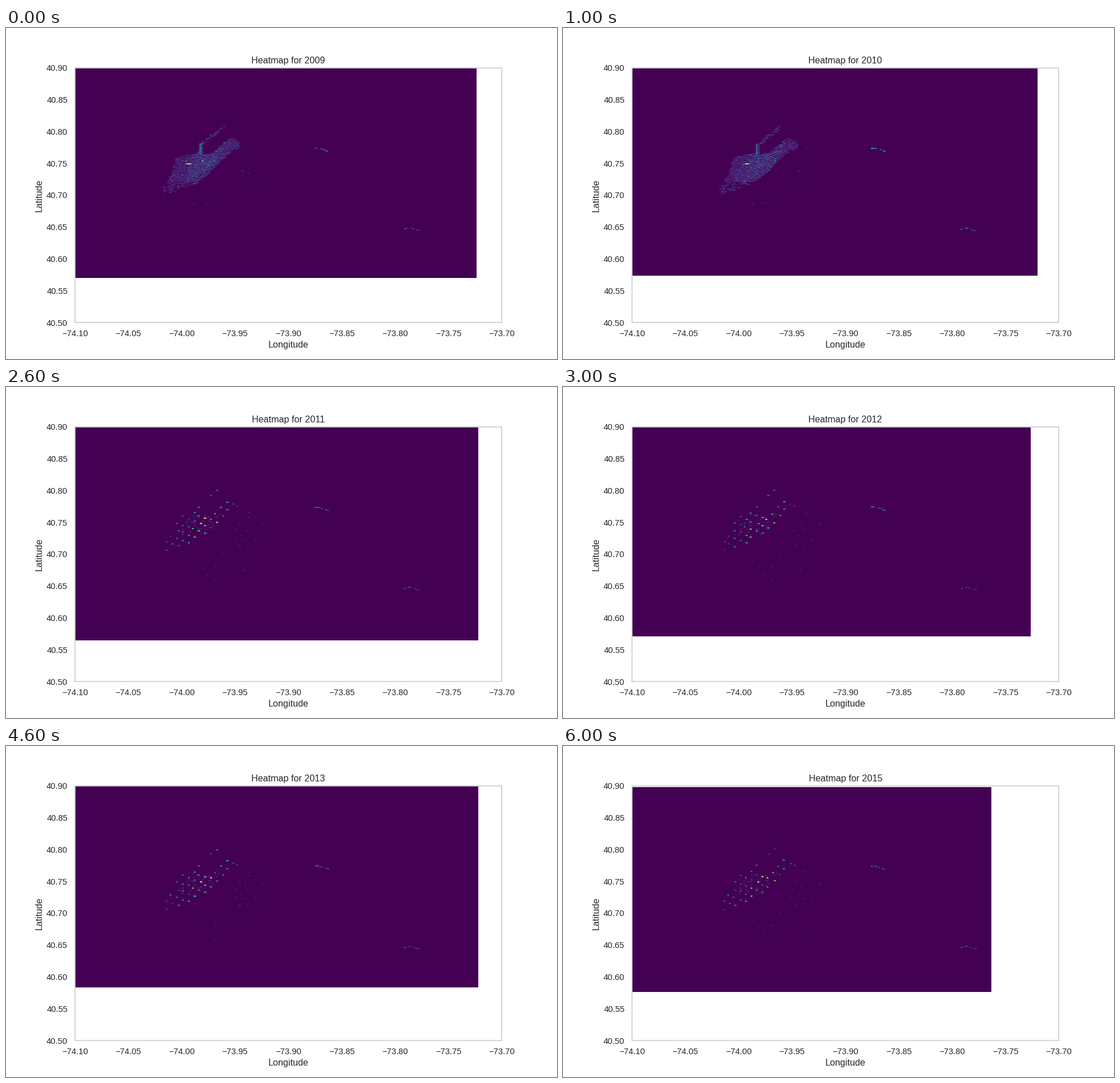
A matplotlib script for the animation above (7 s loop, 966 by 580 pixels).

```python
import numpy as np
import matplotlib.pyplot as plt
from matplotlib.animation import FuncAnimation
from matplotlib.path import Path

W, H, DPI = 966, 580, 100
SCALE = W / 1000  # type and lines are sized for a 1000 px wide figure
BINS = 200
LEFT, RIGHT = 0.125 * W, 0.9 * W
TOP, BOTTOM = 0.12 * H, 0.89 * H

STYLE = {
    "font.family": "Liberation Sans",
    "text.color": ".15",
    "axes.labelcolor": ".15",
    "axes.edgecolor": ".8",
    "xtick.color": ".15",
    "ytick.color": ".15",
    "xtick.bottom": False,
    "ytick.left": False,
}
SIZES = {
    "axes.linewidth": 1.25,
    "axes.labelsize": 12,
    "axes.titlesize": 12,
    "axes.titlepad": 6,
    "axes.labelpad": 4,
    "xtick.labelsize": 11,
    "ytick.labelsize": 11,
    "xtick.major.size": 6,
    "ytick.major.size": 6,
    "xtick.major.pad": 3.5,
    "ytick.major.pad": 3.5,
}
plt.rcParams.update(STYLE)
plt.rcParams.update({key: size * SCALE for key, size in SIZES.items()})

# Stage-pixel extent of the histogram for each year: right, top, bottom.
EXTENTS = {
    2009: (825, TOP, 438),
    2010: (832, TOP, 434),
    2011: (828, TOP, 444),
    2012: (820, TOP, 437),
    2013: (828, TOP, 423),
    2014: (750, 89, 418),
    2015: (751, 72, 431),
}
YEARS = list(EXTENTS)

# Outline of the busy island, with the park as a notch.
ISLAND = Path([
    (386, 166), (338, 204), (337, 218), (299, 227), (290, 256), (275, 279),
    (276, 292), (302, 284), (332, 273), (352, 258), (397, 215), (411, 211),
    (411, 200), (394, 192), (361, 219), (345, 221), (345, 206), (380, 178)])


def lon(x):
    return -74.1 + 0.4 * (x - LEFT) / (RIGHT - LEFT)


def lat(y):
    return 40.9 - 0.4 * (y - TOP) / (BOTTOM - TOP)


def midtown(x, y):
    """Density bump stretched along the avenues."""
    dx, dy = x - 350, y - 235
    return np.exp(-((dx - dy) / 59) ** 2 - ((dx + dy) / 26) ** 2)


def put(grid, year, x, y, level):
    """Raise the bins under stage pixels to at least the given level."""
    right, top, bottom = EXTENTS[year]
    col = ((x - LEFT) / (right - LEFT) * BINS).astype(int)
    row = ((y - top) / (bottom - top) * BINS).astype(int)
    np.maximum.at(grid, (row, col), np.clip(level, 0, 1))


def add_airports(grid, year, peak):
    t = np.linspace(0, 1, 6)
    put(grid, year, 542 + 22 * t, 210.6 + 5.5 * t ** 2,
        peak * (1 - 0.65 * np.sin(np.pi * t)))
    put(grid, year, 700 + 25 * t, 353 - 2 * np.sin(5 * t),
        0.5 * peak * (1 - 0.5 * t))


def add_strays(grid, year, count, peak):
    """Faint spots across the river, the same every year."""
    rng = np.random.default_rng(8)
    angle = rng.uniform(-0.6, 1.8, count)
    radius = rng.uniform(58, 108, count)
    put(grid, year, 345 + radius * np.cos(angle),
        240 + radius * np.sin(angle), rng.uniform(0.3, 1, count) * peak)


def street_grid(year):
    right, top, bottom = EXTENTS[year]
    rng = np.random.default_rng(year)
    steps = (np.arange(BINS) + 0.5) / BINS
    x, y = np.meshgrid(LEFT + steps * (right - LEFT),
                       top + steps * (bottom - top))
    inside = ISLAND.contains_points(
        np.c_[x.ravel(), y.ravel()]).reshape(x.shape)
    row, col = np.indices(x.shape)
    weave = np.where((row + col) % 2, 1, 0.4)
    noise = rng.lognormal(-0.1, 0.4, x.shape)
    level = (0.12 + 0.12 * midtown(x, y)) * weave * noise
    sparse = (y > 270) | (y < 200) & (x < 385)
    level[sparse & (rng.random(x.shape) < 0.4)] = 0
    grid = np.where(inside, level, 0)

    bar = np.linspace(204, 222, 12)
    put(grid, year, np.full(12, 341), bar, rng.uniform(0.2, 0.38, 12))
    station = np.array([317, 320.5, 324])
    put(grid, year, station, np.full(3, 237.3), np.array([0.45, 1, 0.8]))
    add_strays(grid, year, 9, 0.1)
    add_airports(grid, year, 0.45 if year == 2009 else 0.6)
    return grid


def zone_grid(year):
    rng = np.random.default_rng(21)
    yearly = np.random.default_rng(year)
    grid = np.zeros((BINS, BINS))

    haze = rng.normal((345, 238), (20, 12), (60, 2))
    haze = haze[ISLAND.contains_points(haze)]
    put(grid, year, *haze.T, rng.uniform(0.02, 0.1, len(haze)))

    # Zone centres: a loose lattice along avenues (u) and streets (v).
    u, v = (a.ravel() for a in np.mgrid[-7:8, -6:7])
    zones = np.c_[349.7 + 9.8 * u + 9.5 * v, 228.5 - 10.2 * u + 3.8 * v]
    zones = zones[ISLAND.contains_points(zones, radius=2)]
    zones += rng.uniform(-1.5, 1.5, zones.shape) * [1, 0.8]
    x, y = zones.T
    level = (rng.uniform(0.15, 0.45, len(x))
             + 0.75 * midtown(x, y) * rng.uniform(0.6, 1.1, len(x)))
    put(grid, year, x, y, level * yearly.uniform(0.88, 1.1, len(x)))

    add_strays(grid, year, 24, 0.09)
    add_airports(grid, year, 0.4)
    return grid


GRIDS = {year: (street_grid if year < 2011 else zone_grid)(year)
         for year in YEARS}

fig, ax = plt.subplots(figsize=(W / DPI, H / DPI), dpi=DPI)
fig.subplots_adjust(left=0.125, right=0.9, bottom=0.11, top=0.88)
ax.set_xlabel("Longitude")
ax.set_ylabel("Latitude")


def draw(frame):
    year = YEARS[frame]
    right, top, bottom = EXTENTS[year]
    for mesh in list(ax.collections):
        mesh.remove()
    ax.pcolormesh(lon(np.linspace(LEFT, right, BINS + 1)),
                  lat(np.linspace(top, bottom, BINS + 1)),
                  GRIDS[year], cmap="viridis", vmin=0, vmax=1)
    ax.set_xlim(-74.1, -73.7)
    ax.set_ylim(40.5, 40.9)
    ax.set_title(f"Heatmap for {year}")
    return []


anim = FuncAnimation(fig, draw, frames=len(YEARS), init_func=lambda: [],
                     interval=1000, repeat=True, repeat_delay=0)
plt.show()
```
